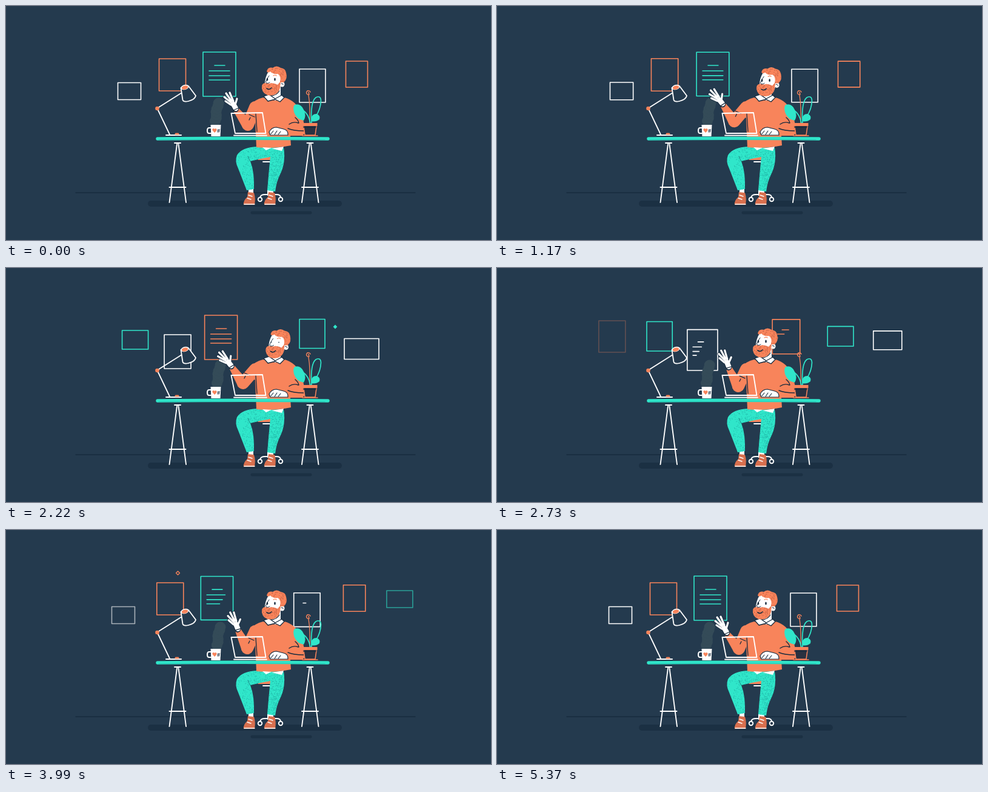
An HTML page with a canvas for the animation above (5400 ms loop, 800 px wide and 386 px high).

```html
<!DOCTYPE html>
<html lang="en">
<head>
<meta charset="utf-8">
<title>Man swiping documents</title>
<style>
  html, body { margin: 0; width: 100%; height: 100%; overflow: hidden; background: #243a4e; }
  canvas { display: block; }
</style>
</head>
<body>
<canvas id="stage" width="800" height="386"></canvas>
<script>
const ctx = document.getElementById('stage').getContext('2d');
const LOOP = 5400, TAU = Math.PI * 2;
const BG = '#243a4e', DARK = '#172b3e', WHITE = '#ffffff', ORANGE = '#f8845b', TEAL = '#30e6ca';
const SWIPES = [1080, 2205, 3330];

const clamp = v => Math.max(0, Math.min(1, v));
const mix = (a, b, p) => a + (b - a) * p;
const mixAll = (a, b, p) => a.map((v, i) => mix(v, b[i], p));
const ease = v => (v = clamp(v), v < .5 ? 2 * v * v : 1 - 2 * (1 - v) ** 2);

function fill(path, color) {
  ctx.fillStyle = color;
  ctx.fill(typeof path === 'string' ? new Path2D(path) : path);
}
function line(path, color, width = 2) {
  ctx.strokeStyle = color;
  ctx.lineWidth = width;
  ctx.stroke(new Path2D(path));
}
function oval(x, y, rx, ry, color, angle = 0) {
  const p = new Path2D();
  p.ellipse(x, y, rx, ry, angle, 0, TAU);
  fill(p, color);
}

// Seeded grain, denser towards the right of the box
function speckle(path, [x, y, w, h], count, color, lean = 1) {
  let seed = 7;
  const rand = () => (seed = seed * 16807 % 2147483647) / 2147483647;
  ctx.save();
  ctx.clip(new Path2D(path));
  ctx.fillStyle = color;
  for (let i = 0; i < count; i++) ctx.fillRect(x + w * rand() ** lean, y + h * rand(), 1, 1);
  ctx.restore();
}

// Wall sheets: x, y, width, height in each slot from left to right
const sheets = [
  { color: WHITE, slots: [[184.5, 126.5, 38, 28], [261, 110, 44, 56], [330, 99, 52, 71], [484, 104, 43, 55], [558, 116.5, 57, 34], [640, 100, 44, 30]] },
  { color: ORANGE, slots: [[190.5, 87, 44, 52], [252.5, 87, 44, 53], [327.5, 78, 54, 73], [493, 87, 43, 52], [560.5, 91, 36, 43], [638, 97, 46, 33]] },
  { color: TEAL, slots: [[191.5, 103, 43, 31], [264, 84, 42, 54], [325, 76, 54, 73], [484, 84.5, 42, 48], [564, 100, 43, 28], [632, 100, 43, 28]] }
];

function drawSheet({ color, slots }, slot, t) {
  const entering = slot < 0, end = slots[slot + 1];
  const start = entering ? [end[0] - 60, ...end.slice(1)] : slots[slot];
  const [x, y, w, h] = mixAll(start, end, ease(t / (entering ? 930 : 800)));
  ctx.globalAlpha = entering ? clamp((t - 400) / 430) : slot === 4 ? clamp(1 - (t - 560) / 250) : 1;
  ctx.strokeStyle = color;
  ctx.lineWidth = 1.6;
  ctx.strokeRect(x, y, w, h);
  if (slot === 1 || slot === 2) {
    const kx = w / 54, ky = h / 73;
    [22, 31, 39, 46].forEach((dy, i) => {
      const shown = slot === 1 ? clamp((t - 350 - 40 * i) / 300) : 1 - clamp((t - 450 + 120 * i) / 320);
      if (shown <= 0) return;
      const left = x + (i ? 10 : 19) * kx, top = y + dy * ky;
      line(`M${left},${top}h${(i ? 34 : 17) * kx * shown}`, color, 1.6);
    });
  }
  ctx.globalAlpha = 1;
}

function drawSheets(time) {
  const done = SWIPES.filter(s => time >= s).length;
  const step = Math.max(0, done - 1), t = done ? time - SWIPES[step] : 0;
  sheets.forEach((sheet, i) => {
    for (let slot = (i + step + 1) % 3 - 1; slot < 5; slot += 3) drawSheet(sheet, slot, t);
  });
}

// x, y, radius, color, birth, death, turns hollow
const sparks = [
  [543, 97, 3.4, TEAL, 1880, 2480, false],
  [366, 86, 4, WHITE, 2990, 3600, false],
  [283.5, 71, 3, ORANGE, 3780, 4740, true],
  [393.5, 127, 4.8, TEAL, 4180, 4800, true]
];
function drawSparks(time) {
  for (const [x, y, size, color, from, to, hollow] of sparks) {
    const r = size * Math.min(ease((time - from) / 180), ease((to - time) / 180));
    if (r <= 0) continue;
    const path = `M${x},${y - r}l${r},${r}l${-r},${r}l${-r},${-r}Z`;
    if (hollow) line(path, color, 1.4);
    else fill(path, color);
  }
}

// wrist x, y, elbow x, y, hand angle, head shift
const REST = [380, 172, 399, 196, 0, 0];
const REACH = [373, 164, 391, 190, -.17, 1];
const RAISE = [383, 166, 398, 195, .13, 0];
const poses = [
  [0, REST], [650, REST], [1080, REACH], [1640, RAISE], [2205, REACH], [2765, RAISE],
  [3330, REACH], [3920, RAISE], [4000, RAISE], [4420, REST], [LOOP, REST]
];
function poseAt(time) {
  const i = poses.findIndex(p => p[0] > time);
  const [t0, a] = poses[i - 1], [t1, b] = poses[i];
  return mixAll(a, b, ease((time - t0) / (t1 - t0)));
}

function drawRoom() {
  fill('M0,0h800v386h-800Z', BG);
  line('M115,308H675', DARK, 1.3);
  line('M239,326H549', '#1b3043', 10);
  line('M406,341H502', '#1b3043', 5);
}

function drawSteam(time) {
  const sway = 1.5 * (1 - Math.cos(time / 900 * TAU));
  for (let i = 0; i < 7; i++) {
    oval(345 + i * .8 + sway + Math.sin(i * 1.4), 190 - i * 5, 9, 8.5, '#344b58');
  }
}

function drawMug() {
  line('M338,201H335Q332,201 332,205.5Q332,210 335,210H338', WHITE, 2);
  fill('M337.500,196H354.500L353.500,215H338.500Z', WHITE);
  fill('M344,209L340.500,205Q340,202 342.500,202Q344,202 344,203.500Q344,202 346,202Q348.500,203 347,206Z', ORANGE);
  ctx.fillStyle = DARK;
  ctx.font = 'italic bold 9px "Liberation Sans", sans-serif';
  ctx.fillText('#', 348, 208.5);
}

function drawLamp() {
  line('M264,213H289', WHITE);
  line('M280,211H284', ORANGE, 3);
  line('M270,212L250,170M252,167L290,143', WHITE, 1.8);
  oval(249.500, 169, 3.3, 3.3, ORANGE);
  const shade = 'M288.500,135L291.500,155Q293,159 301,157Q312,154 313,148L301,132Z';
  fill(shade, BG);
  line(shade, WHITE, 1.8);
  oval(295, 134, 6.8, 4, WHITE, -.25);
  oval(295, 134.5, 5.3, 3, ORANGE, -.25);
}

function drawPlant() {
  line('M501,193Q502,165 499,147', ORANGE, 1.3);
  line('M502,142A3.300,3.300 0 1 0 500,146L499,142', ORANGE, 1.4);
  line('M502,193Q499,178 490,172M504,193Q502,158 511,151Q519,147 519.500,156Q519,170 511,182', TEAL, 1.7);
  fill('M476,163Q486,160 491,171Q496,181 491,189Q479,187 475,175Q473,166 476,163Z', TEAL);
  fill('M503,186Q505,177 513,178Q519,181 517,187Q511,192 503,190Z', TEAL);
  fill('M490,198H512L510,213H493Z', '#2a3140');
  line('M491,199L493,213H510L512,199M489,214H514', ORANGE, 1.6);
  fill('M488,193H513.500V198H488Z', ORANGE);
  line('M491,200H511', DARK, 1.5);
}

function drawTrestle(x) {
  line(`M${x - 5},226h10M${x - 1},228L${x - 13.5},324M${x + 1.5},228L${x + 14},324M${x - 13.5},299h27`, WHITE, 1.9);
}

const PANTS = 'M414,232Q389,233 381,246Q377,256 383,268L397,304L409,302Q410,274 403,256Q418,252 436,249Q433,278 431,304L444,306Q446,290 452,278Q462,258 458,234Z';
function drawLegs() {
  // Chair
  fill('M413,248H437V254H416Z', ORANGE);
  line('M424,257H436', WHITE, 1.8);
  line('M436,257V311M419,316Q420,311 427,311H446Q453,311 453,316', WHITE, 1.8);
  for (const x of [419, 453]) {
    oval(x, 319, 4.2, 4.2, WHITE);
    oval(x, 319, 2.3, 2.3, BG);
  }
  fill('M400,302H408V312H400ZM431,303H441V313H431Z', WHITE);
  fill(PANTS, TEAL);
  speckle(PANTS, [378, 232, 82, 74], 900, '#22b9aa', .55);
  line('M403,256Q400,252 399,248', '#1d8c88', 1);
  // Shoes
  for (const x of [392, 426]) {
    fill(`M${x + 7},307L${x + 17},308Q${x + 20},317 ${x + 18},328H${x}Q${x - 1},321 ${x + 6},315Z`, '#d8704f');
    line(`M${x + 1},327H${x + 18}M${x + 8},312l6,2M${x + 6},317l6,2`, WHITE, 1.4);
  }
}

function drawBody() {
  fill('M424,151Q410,154 404,164Q400,176 411,185L413,233Q440,236 470,230L469,214L489,214Q496,209 492,197Q488,172 476,160Q468,153 459,151L444,156Z', ORANGE);
  fill('M423,233L429,238L438,234ZM438,235L455,239L458,232Z', WHITE);
  line('M465,202Q474,206 491,206M467,195Q474,190 482,193M477,184Q482,188 483,193', DARK, 1.4);
  const hand = 'M434,208Q438,200 446,200L458,203Q466,205 465,213H436Z';
  fill(hand, WHITE);
  line(hand, DARK, 1.2);
  line('M441,206L437,211M447,206L443,212M453,207L449,212', DARK, 1.1);
}

function drawArm([wx, wy, ex, ey, angle]) {
  line(`M411,167L${ex},${ey}`, ORANGE, 20);
  const len = Math.hypot(ex - wx, ey - wy), nx = (ey - wy) / len, ny = (wx - ex) / len;
  const side = (x, y, r) => `${x + nx * r},${y + ny * r}`;
  fill(`M${side(wx, wy, 5)}L${side(ex, ey, 9)}L${side(ex, ey, -10)}L${side(wx, wy, -5)}Z`, ORANGE);
  line(`M412,178L414,207M${ex + 2},${ey - 17}l9,4M${ex + 4},${ey - 12}l-2,4`, DARK, 1.3);

  ctx.save();
  ctx.translate(wx, wy);
  ctx.rotate(angle);
  const fingers = 'M-9,-13L-20,-22M-8,-15L-17,-28M-5,-15L-11,-29M-2,-9L1,-19M-9,-9L-18,-15';
  line(fingers, DARK, 4.8);
  line('M-1,-2L-5,-10', DARK, 10);
  line(fingers, WHITE, 3.2);
  line('M-1,-3L-5,-10', WHITE, 8.5);
  line('M-5,0L4,-4', DARK, 1.2);
  ctx.restore();
}

const HAIR = 'M430,108Q432,100 440,102Q446,97 453,102Q461,103 462,110Q465,120 458,126L452,126Q454,116 449,112Q440,113 436,108Q433,111 430,108Z';
const BEARD = 'M427,127Q421,128 422,136Q424,147 436,147.500Q449,147 452,135L453,124L448,130Q440,126 435,128Z';
function drawHead(shift, time) {
  fill('M436,138L453,133V152L444,156L434,150Z', WHITE);
  line('M437,148Q446,148 451,140', DARK, 1.3);
  const collar = 'M425,149L434,146L444,153L455,147L459,151L452,158L444,154L432,157Z';
  fill(collar, WHITE);
  line(collar, DARK, 1.3);

  ctx.save();
  ctx.translate(shift * 6.5, shift * 1.5);
  fill('M433,108Q427,118 427,128L430,138L450,140L457,122L452,105Z', WHITE);
  oval(455.500, 129, 4, 4.5, WHITE);
  line('M454,128Q457,127 457,130', DARK, 1);
  fill(HAIR, ORANGE);
  speckle(HAIR, [428, 97, 38, 30], 100, '#bf5d43');
  fill(BEARD, ORANGE);
  speckle(BEARD, [420, 122, 34, 27], 130, '#bf5d43');
  line('M434,115Q429,122 428.500,126Q431,129 435,126', DARK, 1);
  line('M430,136Q434,139 438,135', DARK, 1.7);
  const open = Math.min(1, Math.abs(time - 2220) / 80);
  for (const x of [431, 443.5]) oval(x, 121, 1.3, mix(.5, 2.5, open), DARK);
  line('M441,115Q444,113 446,115', ORANGE, 1.2);
  ctx.restore();
}

function drawDesk() {
  line('M250,219Q390,217.500 531,219', TEAL, 5.5);
  line('M252,220.500Q390,219 526,220.500', '#24c5b4', .8);
}

function drawLaptop() {
  line('M371.500,177L423,176L428.500,210H378ZM376,213.500H430', WHITE, 1.8);
}

function draw(now) {
  const time = now % LOOP, pose = poseAt(time);
  ctx.lineCap = ctx.lineJoin = 'round';
  drawRoom();
  drawSheets(time);
  drawSparks(time);
  drawSteam(time);
  drawLamp();
  drawLegs();
  drawBody();
  drawHead(pose[5], time);
  drawArm(pose);
  drawTrestle(283);
  drawTrestle(501.5);
  drawDesk();
  drawMug();
  drawLaptop();
  drawPlant();
}

const began = performance.now();
function tick() {
  draw(performance.now() - began);
  requestAnimationFrame(tick);
}
tick();
</script>
</body>
</html>
```
